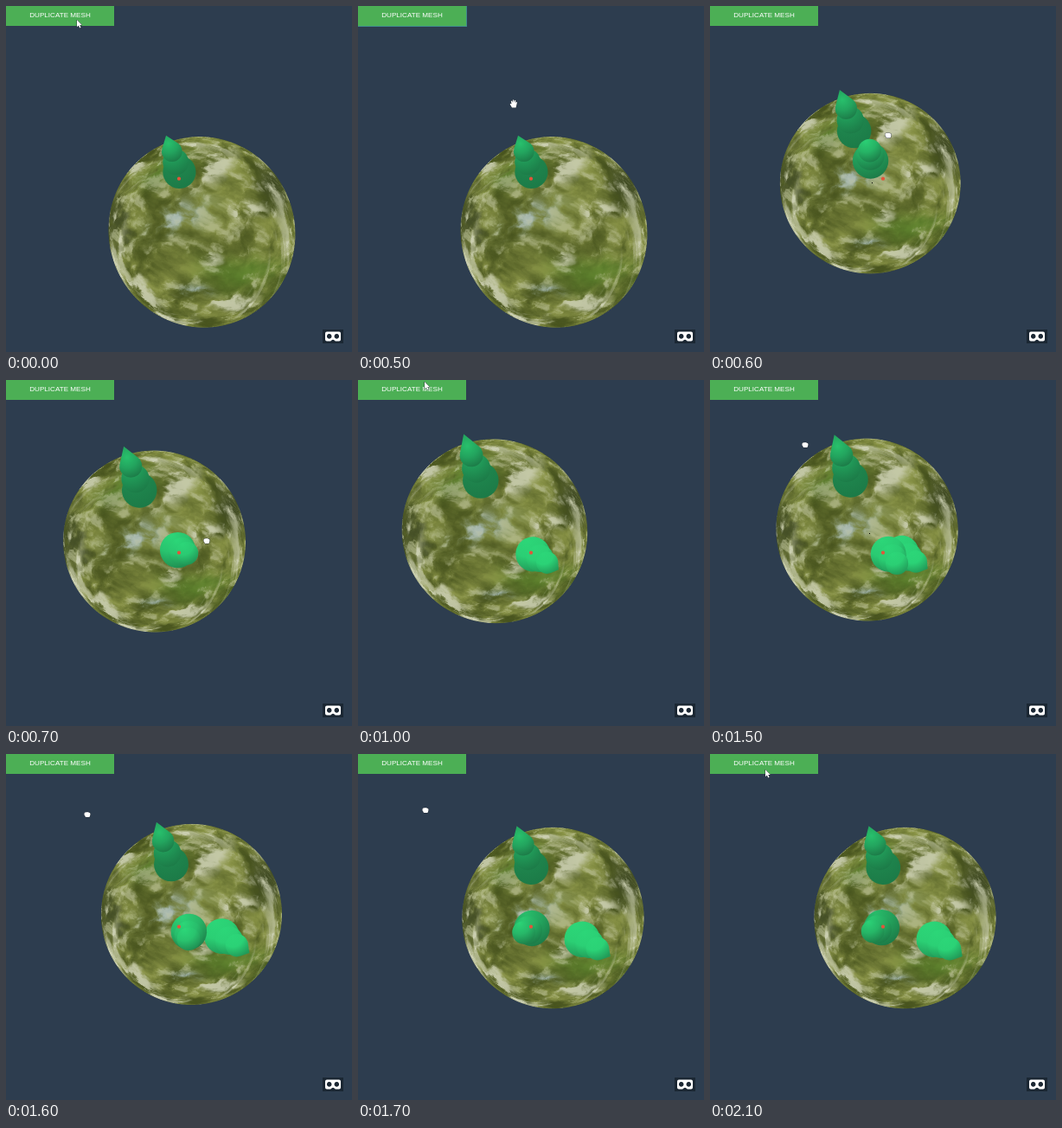
Write an HTML page with a canvas that moves like this. It is 400 px wide and 400 px high and loops after 2200 ms.

```html
<!DOCTYPE html>
<html lang="en">
<head>
<meta charset="utf-8">
<title>Planting trees</title>
<style>
  html, body { margin: 0; width: 100%; height: 100%; overflow: hidden; background: #2d3d4f; }
  canvas { position: absolute; left: 0; top: 0; width: 400px; height: 400px; }
  button {
    position: absolute; left: 0; top: 0; width: 125px; height: 22.5px;
    margin: 0; padding: 0; border: 0; background: #4caf55; color: #fff;
    font: 8.1px/1 Arial, "Liberation Sans", sans-serif;
  }
  button.focus { box-shadow: 0 0 0 1px #3f8c8c; }
  svg { position: absolute; left: 366px; top: 374px; }
</style>
</head>
<body>
<button type="button" tabindex="-1">DUPLICATE MESH</button>
<svg width="24" height="16" viewBox="0 0 24 16">
  <rect width="24" height="16" fill="#1b2733"/>
  <path fill="#fff" fill-rule="evenodd" d="M5 2.5H19Q21 2.5 21 4.5V11.5Q21 13.5 19 13.5H14.8L13 12Q12 11.3 11 12L9.2 13.5H5Q3 13.5 3 11.5V4.5Q3 2.5 5 2.5ZM7.7 5.1a2.8 2.8 0 1 0 .01 0ZM16.3 5.1a2.8 2.8 0 1 0 .01 0Z"/>
</svg>
<canvas></canvas>
<script>
const LOOP = 2200, STEP = 100, SIZE = 400, MID = SIZE / 2;
const canvas = document.querySelector('canvas');
const button = document.querySelector('button');
const ctx = canvas.getContext('2d');
const dpr = window.devicePixelRatio || 1;
canvas.width = canvas.height = SIZE * dpr;

// A camera with an 80 degree view turns on the spot; the globe has radius 1.
const FOCAL = MID / Math.tan(Math.PI * 40 / 180);
const FRONT = 104.5;                              // globe radius in px seen head on
const DIST = Math.hypot(1, FOCAL / FRONT);
const LAG = 50;                                   // a new tree trails the gaze

// time, x, y
const GLOBE = [[500, 226.3, 261], [700, 171.5, 186.5], [800, 158, 174.8],
  [1400, 158, 174.8], [1500, 181.5, 173], [1700, 225.5, 189.5]];
const POINTER = [[200, 82, 16], [500, 180, 113], [700, 232, 186], [800, 209, 139],
  [1000, 77, 2], [1100, 77, 2], [1400, 126, 80], [1700, 78, 65], [2100, 64, 18]];

const clamp = (v, lo = 0, hi = 1) => Math.min(hi, Math.max(lo, v));
const lerp = (a, b, k) => a + (b - a) * k;
const mix = (a, b, k) => a.map((v, i) => lerp(v, b[i], k));
const smooth = (lo, hi, v) => { const k = clamp((v - lo) / (hi - lo)); return k * k * (3 - 2 * k); };
const easeOut = k => k * (2 - k);

function along(keys, t, ease = k => k) {
  const i = keys.findIndex(key => key[0] > t);
  if (i < 1) return keys[i ? keys.length - 1 : 0].slice(1);
  const a = keys[i - 1], b = keys[i];
  return mix(a, b, ease((t - a[0]) / (b[0] - a[0]))).slice(1);
}

// Camera turn that puts the globe at its place on the stage
function viewAt(t) {
  const [tx, ty] = along(GLOBE, t, easeOut).map(p => (p - MID) / FOCAL * 0.835);
  const pitch = Math.atan(ty), yaw = Math.atan(tx * Math.cos(pitch));
  return { cy: Math.cos(yaw), sy: Math.sin(yaw), cp: Math.cos(pitch), sp: Math.sin(pitch) };
}

function toCamera({ cy, sy, cp, sp }, [x, y, z]) {
  const depth = z * cy - x * sy;
  return [x * cy + z * sy, y * cp + depth * sp, depth * cp - y * sp];
}

function toWorld({ cy, sy, cp, sp }, [x, y, z]) {
  const depth = z * cp + y * sp;
  return [x * cy - depth * sy, y * cp - z * sp, depth * cy + x * sy];
}

// Where a sight line meets the globe, relative to its centre; edge fades the outline
function hitGlobe(view, ray) {
  const w = toWorld(view, ray);
  const a = w[0] * w[0] + w[1] * w[1] + w[2] * w[2], b = DIST * w[2];
  const disc = b * b - a * (DIST * DIST - 1);
  if (disc <= 0) return null;
  const s = (b - Math.sqrt(disc)) / a;
  return { point: [s * w[0], s * w[1], s * w[2] - DIST], edge: clamp(disc * 60) };
}

function hash(x, y) {
  const s = Math.sin(x * 127.1 + y * 311.7) * 43758.5453;
  return s - Math.floor(s);
}

function noise(x, y) {
  const i = Math.floor(x), j = Math.floor(y);
  const u = smooth(0, 1, x - i), v = smooth(0, 1, y - j);
  return lerp(lerp(hash(i, j), hash(i + 1, j), u), lerp(hash(i, j + 1), hash(i + 1, j + 1), u), v);
}

function fbm(x, y) {
  let sum = 0, amp = 0.5;
  for (let o = 0; o < 5; o++, amp /= 2, x = x * 2 + 7.3, y = y * 2 + 3.1) sum += amp * noise(x, y);
  return sum / 0.97;
}

// Landmarks: x, y, half width, half height, turn
const CLOUDS = [[60, -16, 24, 13, 0.1], [14, 34, 17, 9, -0.4], [27, -63, 40, 19, -0.9],
  [36, 77, 34, 9, -0.2], [-60, 73, 36, 8, 0.6], [-72, -66, 18, 7, -0.75]];
const BLUES = [[-18, -4, 34, 15, -0.35], [0, 68, 15, 6, 0]];
const DARKS = [[88, -38, 28, 16, 1.1], [-95, 0, 13, 34, 0]];
const GREENS = [[45, 48, 40, 16, 0], [-35, -60, 32, 16, -0.5]];

const cover = (spots, x, y) => spots.reduce((sum, [px, py, w, h, turn]) => {
  const dx = x - px, dy = y - py, c = Math.cos(turn), s = Math.sin(turn);
  return sum + Math.exp(-(((dx * c + dy * s) / w) ** 2) - ((dy * c - dx * s) / h) ** 2);
}, 0);

function surfaceColor(x, y) {
  const r = Math.min(0.999, Math.hypot(x, y) / FRONT);
  const k = Math.asin(r) / (r || 1) / FRONT, u = x * k, v = y * k;
  const warp = fbm(u * 3 + 5, v * 3 + 9);
  const broad = fbm(u * 3 + warp + 11, v * 4 + 4);
  const fine = fbm(u * 7 + warp * 3 + 31, v * 9 + warp * 2 + 17);
  const px = x + (fine - 0.5) * 34, py = y + (warp - 0.5) * 26;
  let c = mix([72, 84, 30], [140, 150, 72], smooth(0.25, 0.75, broad * 0.6 + fine * 0.4));
  c = mix(c, [84, 128, 40], clamp(cover(GREENS, px, py)) * 0.7);
  c = mix(c, [60, 70, 36], clamp(cover(DARKS, px, py)) * 0.75);
  c = mix(c, [158, 180, 186], clamp(cover(BLUES, px, py)) * smooth(0.3, 0.7, fine) * 0.9);
  const rim = fbm(x / FRONT / r * 3 + r * 9 + 20, y / FRONT / r * 3 - r * 9 + 40);
  const haze = smooth(0.52, 0.8, fine) * 0.5 + smooth(0.55, 0.75, rim) * smooth(0.7, 0.95, r) * 0.7;
  const cloud = smooth(0.25, 0.75, cover(CLOUDS, px, py) * (0.2 + fine * 1.1)) * 0.9;
  return mix(c, [202, 206, 176], clamp(Math.max(haze, cloud)));
}

// Head-on colour map, two samples per px
const MAP = Math.ceil(FRONT) * 4;
const surface = Array.from({ length: MAP * MAP }, (_, n) =>
  surfaceColor((n % MAP - MAP / 2) / 2, (Math.floor(n / MAP) - MAP / 2) / 2));

const globe = document.createElement('canvas');
globe.width = globe.height = SIZE;
const globeCtx = globe.getContext('2d');

function paintGlobe(view) {
  const image = globeCtx.createImageData(SIZE, SIZE);
  const cell = v => clamp(Math.round(v * 2 + MAP / 2), 0, MAP - 1);
  for (let n = 0; n < SIZE * SIZE; n++) {
    const i = n % SIZE, j = Math.floor(n / SIZE);
    const hit = hitGlobe(view, [(i + 0.5 - MID) / FOCAL, (j + 0.5 - MID) / FOCAL, 1]);
    if (!hit) continue;
    const [x, y, z] = hit.point, scale = FOCAL / (DIST + z);
    image.data.set(surface[cell(y * scale) * MAP + cell(x * scale)], n * 4);
    image.data[n * 4 + 3] = 255 * hit.edge;
  }
  globeCtx.putImageData(image, 0, 0);
}

const LIT = [44, 214, 120], DIM = [28, 122, 71];
const green = d => `rgb(${mix(LIT, DIM, clamp(d)).map(Math.round)})`;

// Lobes from the ground up: distance of centre and apex from the globe's centre, radius
const LOBES = [[1.04, 1.2, 0.127], [1.165, 1.29, 0.093], [1.28, 1.43, 0.069]];
const FIRST_TREE = [-0.13, -0.369, -0.92];

function drawTree(view, normal) {
  const spot = height => {
    const [x, y, z] = toCamera(view, [normal[0] * height, normal[1] * height, DIST + normal[2] * height]);
    return { x: MID + FOCAL * x / z, y: MID + FOCAL * y / z, scale: FOCAL / z };
  };
  const foot = spot(1.04), tip = spot(1.43);
  // the visible side faces away from the lean; light comes from the upper left
  const shade = clamp(0.45 - ((tip.x - foot.x) * 0.8 + (tip.y - foot.y) * 0.6) / 80, 0.08, 0.9);
  LOBES.forEach(([low, high, size], i) => {
    const { x, y, scale } = spot(low), apex = spot(high), r = size * scale;
    const reach = Math.hypot(apex.x - x, apex.y - y), angle = Math.atan2(apex.y - y, apex.x - x);
    const half = reach > r ? Math.acos(r / reach) : 0;
    const tone = shade * (1 - 0.2 * i);
    const fill = ctx.createRadialGradient(x - r * 0.35, y - r * 0.8, 0, x - r * 0.35, y - r * 0.8, r * 1.9);
    fill.addColorStop(0, green(tone - 0.3));
    fill.addColorStop(0.5, green(tone));
    fill.addColorStop(1, green(tone + 0.6));
    ctx.fillStyle = fill;
    ctx.beginPath();
    ctx.arc(x, y, r, angle + half, angle - half + Math.PI * 2);
    if (half) ctx.lineTo(apex.x, apex.y);
    ctx.fill();
  });
}

// The spot under the gaze, followed until the tree is dropped
const planted = t => hitGlobe(viewAt(t), [0, 0, 1]).point;

const ARROW = new Path2D('M0 0V8.2L1.9 6.5L3.2 9.4L4.6 8.8L3.3 6H5.8Z');
const FIST = new Path2D('M-3.5 -1.2Q-3 -3 -1.8 -2.4Q-1 -3.4 0 -2.6Q1 -3.3 1.8 -2.3Q3.6 -2.6 3.5 -.5Q3.5 1.2 2.4 3H-2Q-2.6 1.4 -3.5 .6Z');
const HAND = new Path2D('M-2 4.5L-4.3 .4Q-4.2 -.8 -3 0L-2.4 .6L-3.2 -3Q-2.4 -4.2 -1.8 -3L-1.2 -1.2L-1.1 -4.3Q-.3 -5.2 .2 -4.2L.4 -1.3L1.1 -4Q2 -4.6 2.3 -3.5L2 -.8L2.9 -2.3Q4 -2.6 3.9 -1.3L2.6 4.5Z');

function drawPointer(x, y, dragging) {
  const shape = y < 23 ? ARROW : dragging ? FIST : HAND;
  ctx.save();
  ctx.translate(x, y);
  ctx.lineWidth = 0.8;
  ctx.strokeStyle = '#1c242c';
  ctx.fillStyle = '#fff';
  ctx.stroke(shape);
  ctx.fill(shape);
  ctx.restore();
}

function draw(t) {
  const view = viewAt(t);
  paintGlobe(view);
  ctx.setTransform(dpr, 0, 0, dpr, 0, 0);
  ctx.clearRect(0, 0, SIZE, SIZE);
  ctx.drawImage(globe, 0, 0);
  drawTree(view, FIRST_TREE);
  if (t > 500) drawTree(view, planted(Math.min(t - LAG, 800)));
  if (t > 1400) drawTree(view, planted(t - LAG));
  ctx.fillStyle = '#e2553a';
  ctx.beginPath();
  ctx.arc(MID, MID - 0.3, 2.1, 0, Math.PI * 2);
  ctx.fill();
  const dragging = (t > 500 && t < 800) || (t > 1400 && t < 1800);
  drawPointer(...along(POINTER, t), dragging);
  button.classList.toggle('focus', (t >= 300 && t < 600) || (t >= 1200 && t < 1500));
}

let start = null, shown = null;
function tick(now) {
  if (start === null) start = now;
  const t = Math.floor((now - start) % LOOP / STEP) * STEP;
  if (t !== shown) draw(shown = t);
  requestAnimationFrame(tick);
}
requestAnimationFrame(tick);
</script>
</body>
</html>
```
